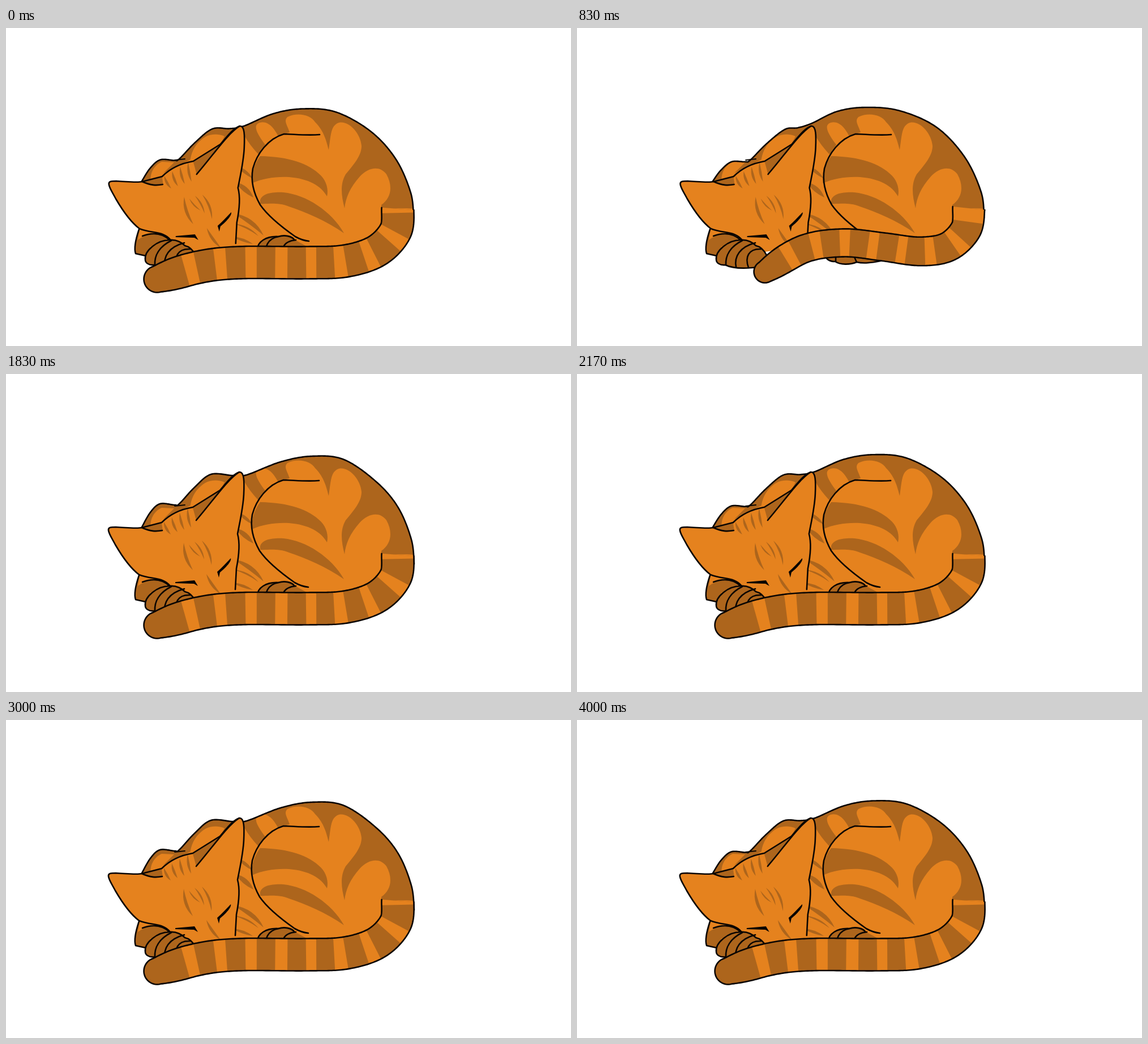
These frames come from a looping animation (998x561 px, 4170 ms). An HTML page with a canvas:

```html
<!DOCTYPE html>
<html lang="en">
<head>
<meta charset="utf-8">
<title>Sleeping cat</title>
<style>
  html, body { margin: 0; width: 100%; height: 100%; overflow: hidden; background: #fff; }
  canvas { display: block; width: 998px; height: 561px; }
</style>
</head>
<body>
<canvas id="stage" width="998" height="561"></canvas>
<script>
const ctx = document.getElementById('stage').getContext('2d');
const ORANGE = '#e5821e', BROWN = '#ad651c', INK = '#0a0502';
const LOOP = 4170, STEP = 1000 / 6;

const points = s => s.split(' ').map(p => p.split(',').map(Number));
const lerp = (a, b, k) => a + (b - a) * k;
const mix = (a, b, k) => a.map((p, i) => p.map((n, j) => lerp(n, b[i][j], k)));

// Neck and back, breathed out and breathed in.
const backOut = points('240,270 255,244 272,229 298,231 306,229 333,200 362,177 400,179 425,178 485,155 540,145 597,151 655,191 693,236 716,292 721,335');
const backIn = points('240,270 254,251 273,236 297,236 306,233 335,204 367,179 390,176 415,168 460,147 510,140 570,146 635,175 685,228 714,290 719,335');

// Tail centre line from tip to base: at rest, drawn in, raised over the face.
const tails = [
  { line: points('267,443 340,422 410,414 530,414 600,411 655,393 688,358 692,319'), half: 28.5, tipLength: 51, pitch: 53 },
  { line: points('332,430 400,390 470,379 540,386 605,394 655,386 687,355 692,318'), half: 24.5, tipLength: 42, pitch: 50.6 },
  { line: points('299,371 347,388 452,420 520,427 580,422 640,402 681,362 689,322'), half: 24.5, tipLength: 52, pitch: 58.5 }
];

// The cat breathes once in eight drawings; the first breath is the deepest.
function breathAt(i) {
  const wave = .5 - .75 * Math.cos((i - 2) * Math.PI / 4);
  return Math.max(0, Math.min(i < 8 ? 1 : .55, wave));
}
const flickAt = i => i > 3 && i < 8 ? (i - 3) / 2 : 0;

// Catmull-Rom point between pts[i] and pts[i + 1].
function curvePoint(pts, i, t) {
  const at = j => pts[Math.max(0, Math.min(pts.length - 1, j))];
  const [a, b, c, d] = [at(i - 1), at(i), at(i + 1), at(i + 2)];
  return [0, 1].map(j => b[j] + t / 2 * (c[j] - a[j]
    + t * (2 * a[j] - 5 * b[j] + 4 * c[j] - d[j] + t * (3 * (b[j] - c[j]) + d[j] - a[j]))));
}
function smooth(pts, n = 24) {
  const out = [];
  for (let k = 0; k < (pts.length - 1) * n; k++) out.push(curvePoint(pts, Math.floor(k / n), k % n / n));
  return [...out, pts[pts.length - 1]];
}
const polyline = pts => new Path2D('M' + pts.join('L'));

const toPath = d => d instanceof Path2D ? d : new Path2D(d);
function fill(d, color) { ctx.fillStyle = color; ctx.fill(toPath(d)); }
function line(d, width = 2.6) { ctx.strokeStyle = INK; ctx.lineWidth = width; ctx.stroke(toPath(d)); }

// Pointed stripe whose two sides bulge by the given amounts.
function leaf(x0, y0, x1, y1, sideA, sideB) {
  const dx = x1 - x0, dy = y1 - y0, len = Math.hypot(dx, dy);
  const bulge = b => [(x0 + x1) / 2 + dy / len * b * 2, (y0 + y1) / 2 - dx / len * b * 2];
  fill(`M${x0} ${y0}Q${bulge(sideA)} ${x1} ${y1}Q${bulge(sideB)} ${x0} ${y0}`, BROWN);
}

const shapes = {
  saddle: `M663 322C690 316 705 319 760 320V100H230V280L380 205L421 190C428 202 436 212 446 223L458 206
    C440 182 437 171 448 167C464 163 474 178 481 191L501 184C497 172 490 164 497 157C515 148 538 153 546 166
    C562 182 566 200 570 215C574 190 573 172 588 167C605 163 626 185 628 208C628 225 615 240 600 258
    C590 275 592 295 598 318C600 300 607 282 625 262C640 246 660 242 672 258C684 280 680 300 663 312Z`,
  shoulder: 'M325 236C327 220 333 204 352 192C364 185 380 188 386 191L378 206Z',
  neck: 'M256 272C253 258 261 242 275 236L297 237L262 272Z',
  thighBands: `M449 226C500 227 535 239 556 260C566 270 570 285 567 297C556 278 535 266 500 263C475 262 455 265 434 274C434 252 440 238 449 226Z
    M449 304C452 292 470 289 490 290C530 294 575 323 597 362C565 340 530 325 500 315C480 307 462 311 449 310Z`,
  thigh: 'M553 188C530 190 505 187 490 187C462 195 442 222 435 248C431 270 436 291 448 312C462 332 490 354 510 368C517 372 525 375 534 376',
  head: `M405 380L407 343C411 323 414 300 409 282C414 256 419 235 420 212C421 190 421 172 412 173
    C400 177 388 194 378 205L330 235C306 239 288 249 275 262L240 271C230 273 215 271 194 270
    C186 270 180 270 181 276C182 283 188 291 193 301C200 313 215 339 235 354C258 363 278 358 290 374`,
  headDetail: 'M412 173C390 187 367 222 336 258M240 271C255 278 265 278 276 276',
  innerEars: 'M238 272L275 263L277 277C263 279 250 276 238 272ZM330 236L379 204L336 258Z',
  eyes: 'M299 367L333 364L339 374L332 370L299 369ZM397 325C399 330 388 342 378 350L376 359L373 349C381 342 389 333 397 325Z',
  arm: 'M235 355C229 373 226 390 229 398L247 402L295 380L286 363C267 359 250 359 235 355Z',
  armLight: 'M236 356L277 360C260 362 246 364 233 374ZM254 386L286 371L291 377L258 391Z',
  armLines: 'M235 355C229 373 226 390 229 398L247 402M241 367C257 361 275 361 289 374',
  paw: `M246 409C244 393 267 374 289 374C301 373 310 378 316 384C326 386 331 393 335 401L338 417
    C320 424 280 427 262 418C252 419 246 414 246 409Z`,
  pawLines: 'M292 375C270 386 262 402 263 418M315 379C288 386 277 403 281 422M325 390C303 389 296 404 303 423',
  hindPaw: `M536 411C520 414 507 416 494 413C482 418 465 418 456 412C444 412 439 406 439 401L444 392
    C443 377 460 367 481 368C493 364 505 368 509 373`,
  hindLines: 'M481 368C463 371 456 384 457 412M512 374C490 376 482 390 494 413'
};

function drawBody(breath) {
  const back = smooth(mix(backOut, backIn, breath)), body = polyline(back);
  for (const p of points('700,365 660,393 600,402 510,403 410,397 350,386')) body.lineTo(...p);
  body.closePath();
  ctx.save();
  ctx.clip(body);
  fill(body, ORANGE);
  fill(shapes.saddle, BROWN);
  fill(shapes.shoulder, ORANGE);
  fill(shapes.neck, ORANGE);
  fill(shapes.thighBands, BROWN);
  leaf(408, 244, 435, 265, 4, -2);
  leaf(405, 272, 437, 299, 6, -3);
  leaf(402, 327, 455, 366, 9, 1);
  leaf(402, 345, 446, 367, 5, 2);
  leaf(400, 368, 436, 381, 3, -2);
  ctx.restore();
  line(polyline(back));
  line('M298 233L316 231', 1.8);
  fill(shapes.hindPaw + 'L540 390Z', BROWN);
  line(shapes.hindPaw);
  line(shapes.hindLines);
  ctx.save();
  ctx.translate(breath * 2, 0);
  line(shapes.thigh);
  ctx.restore();
}

function drawHead(breath) {
  fill(shapes.arm, BROWN);
  fill(shapes.armLight, ORANGE);
  line(shapes.armLines);
  ctx.save();
  ctx.translate(breath * 1.5, 0);
  fill(shapes.head + 'L330 395L405 384Z', ORANGE);
  fill(shapes.innerEars, BROWN);
  for (let k = 0; k < 4; k++) leaf(279 + 14 * k, 261 - 8 * k, 291 + 12 * k, 283 - 4 * k, -4, .5);
  leaf(314, 298, 330, 346, -7, -1.5);
  leaf(323, 301, 343, 322, -3, -.5);
  leaf(333, 296, 350, 327, 1, 4);
  leaf(346, 294, 363, 337, 2, 6);
  leaf(354, 353, 379, 388, -5, 0);
  line(shapes.head);
  line(shapes.headDetail);
  fill(shapes.eyes, INK);
  ctx.restore();
  fill(shapes.paw, BROWN);
  line(shapes.paw);
  line(shapes.pawLines);
}

function drawTail(flick) {
  const from = tails[Math.min(1, Math.floor(flick))], to = tails[Math.min(1, Math.floor(flick)) + 1];
  const k = flick - Math.min(1, Math.floor(flick));
  const value = name => lerp(from[name], to[name], k);
  const sag = Math.max(0, 48 * flick * (1 - flick));
  const keys = mix(from.line, to.line, k).map(([x, y], i) => [x, y + sag * (1 - i / 7)]);
  const centre = smooth(keys), last = centre.length - 1;

  // Offset both ways, narrow at the tip and equally wide at the base.
  const upper = [], lower = [], arc = [0];
  centre.forEach(([x, y], i) => {
    const [ax, ay] = centre[Math.max(0, i - 1)], [bx, by] = centre[Math.min(last, i + 1)];
    if (i) arc.push(arc[i - 1] + Math.hypot(x - ax, y - ay));
    const angle = Math.atan2(by - ay, bx - ax), u = i / last;
    const half = lerp(value('half'), 28.5, u ** 3) - 5 * Math.max(0, 1 - arc[i] / 50) ** 2;
    const nx = Math.sin(angle) * half, ny = -Math.cos(angle) * half;
    upper.push([x + nx, y + ny]);
    lower.push([x - nx, y - ny]);
  });
  const [tx, ty] = centre[0], cap = [];
  const radius = Math.hypot(upper[0][0] - tx, upper[0][1] - ty);
  const first = Math.atan2(upper[0][1] - ty, upper[0][0] - tx);
  for (let a = .1; a < Math.PI; a += .1) cap.push([tx + radius * Math.cos(first - a), ty + radius * Math.sin(first - a)]);
  const edge = polyline([...upper].reverse().concat(cap, lower));

  // Evenly spaced light bands; past the last dark one the base stays light.
  fill(edge, BROWN);
  const pitch = value('pitch'), tipLength = value('tipLength');
  const count = Math.floor((arc[last] - tipLength) / pitch);
  const indexAt = s => { const i = arc.findIndex(a => a >= s); return i < 0 ? last : i; };
  for (let n = 0; n <= count; n++) {
    const start = tipLength + n * pitch;
    const a = indexAt(start), b = n < count ? indexAt(start + pitch * .36) : last;
    fill(polyline([...upper.slice(a, b + 1), ...lower.slice(a, b + 1).reverse()]), ORANGE);
  }
  line(edge);
}

function draw(now) {
  const i = Math.min(24, Math.floor((now % LOOP + 3.4) / STEP));
  ctx.fillStyle = '#fff';
  ctx.fillRect(0, 0, 998, 561);
  ctx.lineCap = ctx.lineJoin = 'round';
  drawBody(breathAt(i));
  drawHead(breathAt(i));
  drawTail(flickAt(i));
}

let start;
function tick(now) {
  start ??= now;
  draw(now - start);
  requestAnimationFrame(tick);
}
draw(0);
requestAnimationFrame(tick);
</script>
</body>
</html>
```
